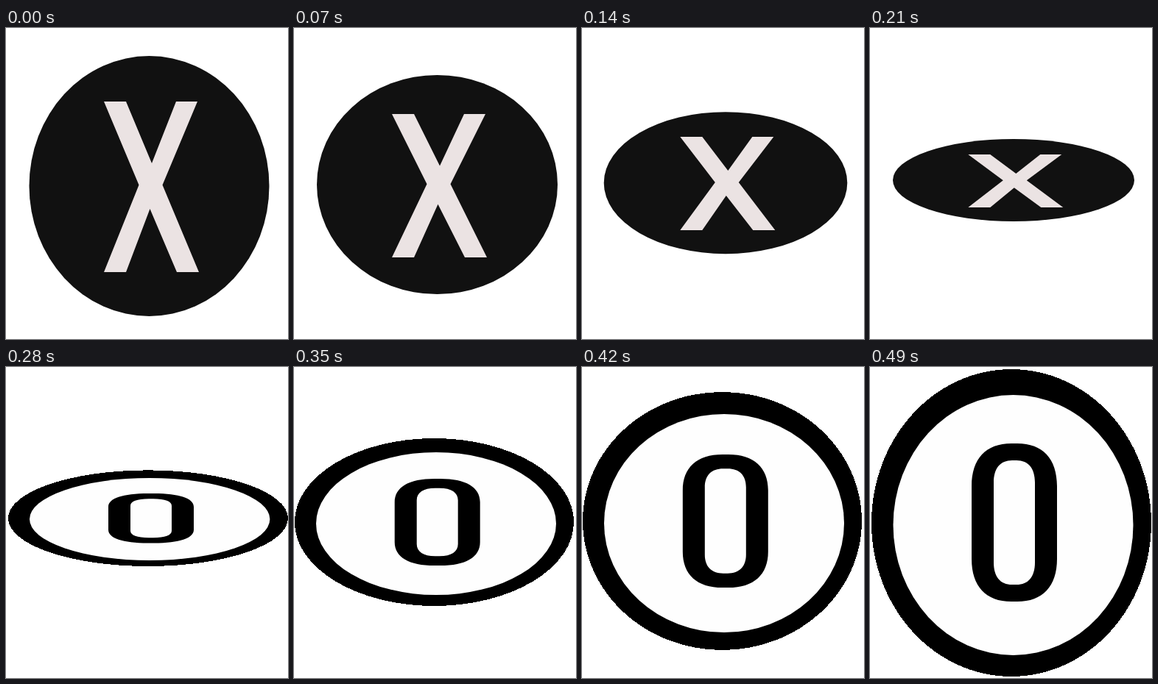
An HTML page that plays this animation: 383x423 px, repeating every 560 ms.

```html
<!DOCTYPE html>
<html lang="en">
<head>
<meta charset="utf-8">
<title>Flipping coin</title>
<style>
  html, body { margin: 0; width: 100%; height: 100%; overflow: hidden; background: #fff; }
  svg { display: block; width: 383px; height: 423px; }
</style>
</head>
<body>
<svg viewBox="0 0 383 423">
  <ellipse id="rim" shape-rendering="crispEdges"/>
  <ellipse id="face"/>
  <path id="letter"/>
</svg>
<script>
const STEP = 70;

// Ellipses are [cx, cy, rx, ry]; letters are [left, top, height].
const poses = [
  { face: [194.5, 215, 163, 177], x: [133, 100, 232] },
  { face: [194.5, 213, 163.5, 149], x: [133, 117, 195] },
  { face: [195, 210.7, 165.3, 96.5], x: [133.3, 148, 127] },
  { face: [195, 207, 164, 56], x: [133.3, 172, 72] },
  { rim: [193, 205.7, 190, 65.3], face: [195.2, 207, 163.2, 56], o: [139, 172, 67.5] },
  { rim: [190.5, 211, 189.5, 114], face: [193, 213, 163, 97], o: [136.7, 152, 118] },
  { rim: [190.5, 209.5, 189.5, 175.5], face: [193, 212.5, 163, 148.5], o: [136.8, 119, 181] },
  { rim: [192, 212, 190, 209], face: [194.5, 215, 163, 177], o: [138, 104, 215] }
];

const X_POINTS = [
  [0, 0], [30, 0], [65, .362], [98, 0], [127, 0], [79.5, .489],
  [129, 1], [99, 1], [62.5, .629], [30, 1], [0, 1], [47.5, .489]
];

const [rim, face, letter] = ["rim", "face", "letter"].map(id => document.getElementById(id));

function setEllipse(el, values) {
  ["cx", "cy", "rx", "ry"].forEach((name, i) => el.setAttribute(name, values[i]));
}

function xPath([left, top, height]) {
  return "M" + X_POINTS.map(([x, y]) => `${left + x},${top + y * height}`).join("L") + "Z";
}

// Box with soft, slightly squared corners.
function roundBox(x, y, w, h, rx, ry) {
  const a = rx * .64, b = ry * .64;
  return `M${x + rx},${y}h${w - 2 * rx}c${a},0 ${rx},${ry - b} ${rx},${ry}` +
    `v${h - 2 * ry}c0,${b} ${a - rx},${ry} ${-rx},${ry}` +
    `h${2 * rx - w}c${-a},0 ${-rx},${b - ry} ${-rx},${-ry}` +
    `v${2 * ry - h}c0,${-b} ${rx - a},${-ry} ${rx},${-ry}Z`;
}

function oPath([left, top, height]) {
  const wall = height * .107;
  return roundBox(left, top, 116, height, 54, height * .27) +
    roundBox(left + 30, top + wall, 56, height - 2 * wall, 25, height * .14);
}

function draw(time) {
  const pose = poses[Math.floor(time / STEP) % poses.length];
  const light = Boolean(pose.o);
  setEllipse(rim, pose.rim || [0, 0, 0, 0]);
  setEllipse(face, pose.face);
  face.setAttribute("fill", light ? "#fefefe" : "#111");
  letter.setAttribute("d", light ? oPath(pose.o) : xPath(pose.x));
  letter.setAttribute("fill", light ? "#000" : "#ebe3e3");
  letter.setAttribute("fill-rule", "evenodd");
}

const start = performance.now();
function tick() {
  draw(performance.now() - start);
  requestAnimationFrame(tick);
}
tick();
</script>
</body>
</html>
```
